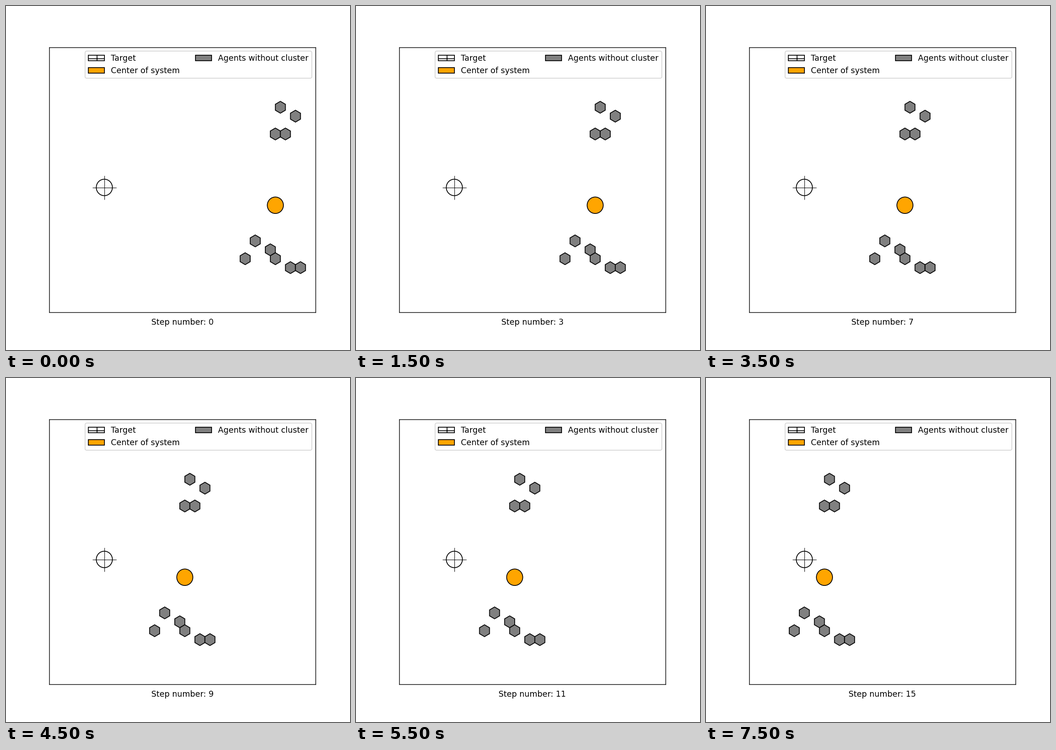
A matplotlib script for the animation above (8000 ms loop, 748 by 748 pixels).

```python
import matplotlib.pyplot as plt
from matplotlib.animation import FuncAnimation
from matplotlib.patches import Circle, Patch, RegularPolygon

SIZE, DPI = 748, 125
STEPS, STEP_MS = 16, 500
ROW = 3 ** 0.5 / 2  # row spacing of a unit hex grid

# (column, row) on the hex grid, counted from the crosshair
AGENTS = [(17.5, 9), (19, 8), (17, 6), (18, 6), (15, -6),
          (16.5, -7), (14, -8), (17, -8), (18.5, -9), (19.5, -9)]
CENTER = (17, -2)


def place(cell, step=0):
    """Position of a grid cell after moving left by the given steps."""
    col, row = cell
    return col - step, row * ROW


fig, ax = plt.subplots(figsize=(SIZE / DPI, SIZE / DPI), dpi=DPI)
ax.set(xlim=(-5.5, 21), ylim=(-14 * ROW, 14 * ROW + 1.5), xticks=[], yticks=[])
label = ax.set_xlabel("", labelpad=7.5)

ax.add_patch(Circle((0, 0), 0.8, fc="white", ec="black"))
ax.plot(0, 0, "k+", markersize=30.5, markeredgewidth=0.6)

center = ax.add_patch(Circle(place(CENTER), 0.8, fc="orange", ec="black"))
agents = [ax.add_patch(RegularPolygon(place(cell), 6, radius=3 ** -0.5,
                                      fc="gray", ec="black"))
          for cell in AGENTS]

ax.legend(handles=[
    Patch(fc="white", ec="black", hatch="+", label="Target"),
    Patch(fc="orange", ec="black", label="Center of system"),
    Patch(fc="gray", ec="black", label="Agents without cluster"),
], loc="upper right", ncol=2)


def update(step):
    center.center = place(CENTER, step)
    for hexagon, cell in zip(agents, AGENTS):
        hexagon.xy = place(cell, step)
    label.set_text(f"Step number: {step}")
    return [center, *agents, label]


anim = FuncAnimation(fig, update, frames=STEPS, interval=STEP_MS,
                     repeat=True, repeat_delay=0, blit=False)
plt.show()
```
